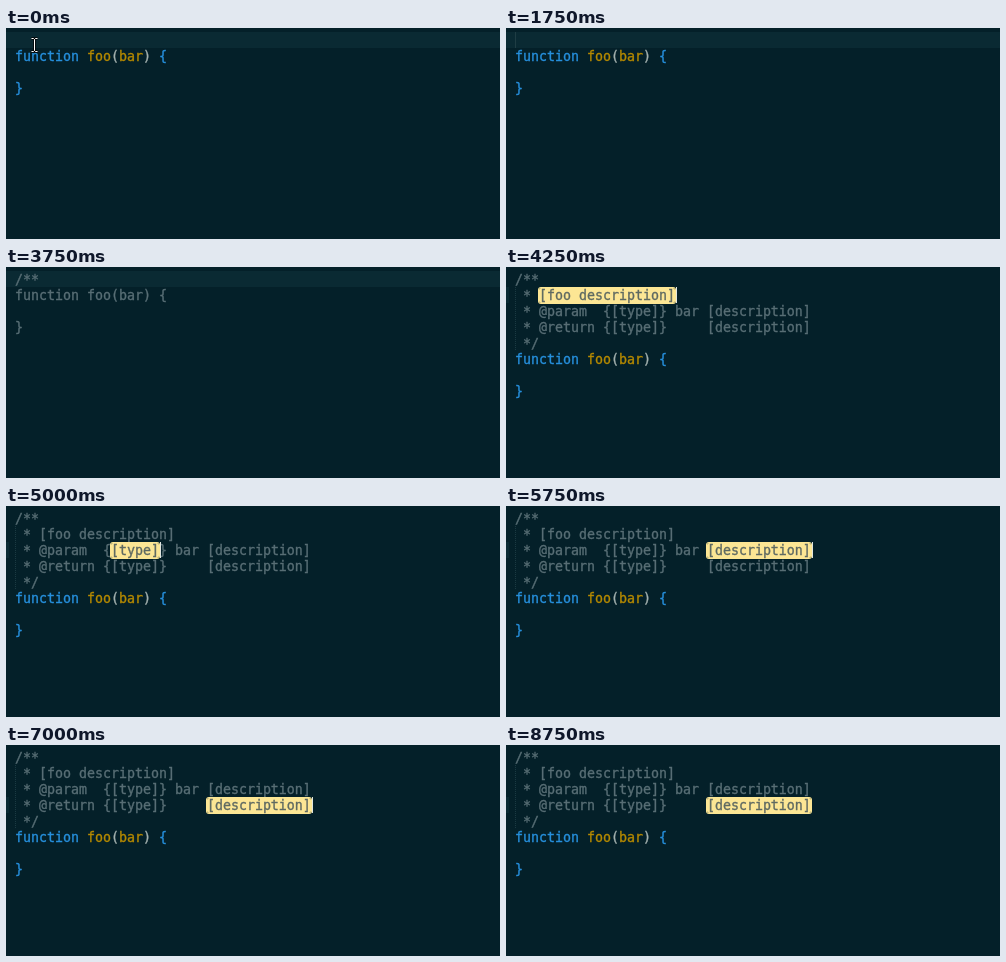
Write an HTML page that moves like this. It is 494 by 211 pixels and loops after 9000 ms.

```html
<!DOCTYPE html>
<html lang="en">
<head>
<meta charset="utf-8">
<title>Doc comment completion</title>
<style>
  html, body { margin: 0; width: 100%; height: 100%; overflow: hidden; background: #042029; }
  pre { position: absolute; left: 9px; top: 5px; margin: 0; color: #586e75;
        font: 13.29px/16px "DejaVu Sans Mono", monospace; -webkit-text-stroke: .35px; }
  #line { position: absolute; left: 0; height: 16px; background: #0a2a33; }
  #guide { position: absolute; left: 9px; top: 20px; width: 1px; height: 64px;
           background: repeating-linear-gradient(#1b3a42 0 1px, transparent 1px 2px); }
  #mouse { position: absolute; left: 24px; top: 9px; }
  .key { color: #268fdc; }
  .name { color: #b58900; }
  .paren { color: #a3b0ae; }
  mark { background: #fce694; color: #5f6a62; border-radius: 2px; box-shadow: 0 0 0 1px #fce694; }
  i { position: absolute; width: 1px; height: 16px; margin-top: -1px; background: #dfe5e0; }
  mark + i { margin-left: 1px; }
</style>
</head>
<body>
<div id="line"></div>
<div id="guide"></div>
<pre id="text"></pre>
<svg id="mouse" width="9" height="16" fill="none">
  <path id="beam" d="M1.5 1.5h2l1 1 1-1h2M4.5 2.5v11M1.5 14.5h2l1-1 1 1h2" stroke="#000" stroke-width="2.4"/>
  <path d="M1.5 1.5h2l1 1 1-1h2M4.5 2.5v11M1.5 14.5h2l1-1 1 1h2" stroke="#fff"/>
</svg>
<script>
const LOOP = 9000, STEP = 250;
const BLINK = [1, 1, .8, 0, .4];
const FIELD_ROWS = [1, 2, 2, 3, 3];

// Typed text, or the number of the selected template field
const EVENTS = [
  [0, ""], [2500, "/"], [2750, "/*"], [3000, "/**"],
  [4250, 0], [5000, 1], [5750, 2], [6250, 3], [6750, 4]
];

const PLAIN = "function foo(bar) {\n\n}";
const span = (kind, s) => `<span class="${kind}">${s}</span>`;
const CODE = span("key", "function ") + span("name", "foo") + span("paren", "(") +
  span("name", "bar") + span("paren", ")") + span("key", " {\n\n}");
const DOC = `/**
 * [foo description]
 * @param  {[type]} bar [description]
 * @return {[type]}     [description]
 */
`;

const [line, guide, text, mouse] =
  ["line", "guide", "text", "mouse"].map(id => document.getElementById(id));

function caretOpacity(t, start) {
  if (start === 0) return t < 750 ? 0 : t < 1000 ? .6 : t < 1250 ? .3 : .1;
  return BLINK[Math.floor((t - start) / STEP) % BLINK.length];
}

function draw(t) {
  const [start, state] = EVENTS.findLast(e => e[0] <= t);
  const caret = `<i style="opacity:${caretOpacity(t, start)}"></i>`;
  const selecting = typeof state === "number";

  if (selecting) {
    let n = 0;
    text.innerHTML = DOC.replace(/\[.*?\]/g,
      field => n++ === state ? `<mark>${field}</mark>${caret}` : field) + CODE;
  } else {
    text.innerHTML = state + caret + "\n" + (state.length > 1 ? PLAIN : CODE);
  }
  line.style.top = 4 + 16 * (selecting ? FIELD_ROWS[state] : 0) + "px";
  line.style.width = selecting ? "3px" : "100%";
  guide.hidden = !selecting;
  mouse.style.display = t < 250 ? "" : "none";
}

let shown = -1;
function tick() {
  const step = Math.floor(performance.now() % LOOP / STEP);
  if (step !== shown) draw((shown = step) * STEP);
  requestAnimationFrame(tick);
}
tick();
</script>
</body>
</html>
```
